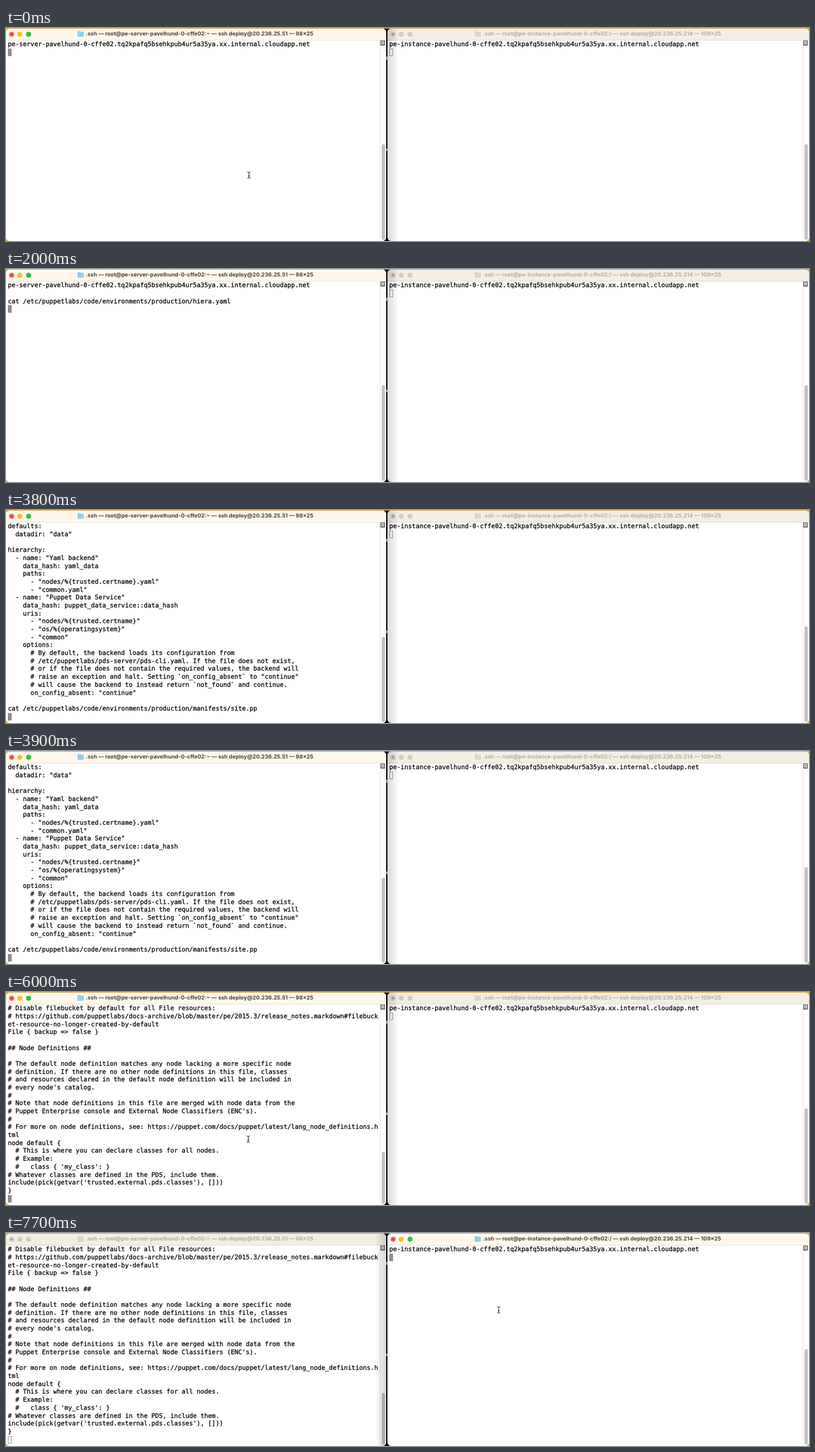
Animation, 1280 px wide and 341 px high, one loop 8 s. Source, as an HTML page:

```html
<!DOCTYPE html>
<html lang="en">
<head>
<meta charset="utf-8">
<title>Two terminals</title>
<style>
html, body { margin: 0; width: 100%; height: 100%; overflow: hidden; }
body { position: relative; background:
  linear-gradient(#888 0 0) 606px 46px / 2px 5px no-repeat,
  linear-gradient(#888 0 0) 606px 193px / 2px 4px no-repeat,
  linear-gradient(#000 0 0) 600px 1px / 14px 340px no-repeat, #d3a54e; }
div, pre, i, svg { position: absolute; box-sizing: border-box; margin: 0; }
.win { top: 1px; height: 340px; border-radius: 6px; overflow: hidden; background: #fff; text-rendering: geometricPrecision; }
.bar { left: 0; right: 0; top: 0; height: 19px; background: #f3ede4; border-bottom: 1px solid #e3ddd5; }
.title { top: 0; width: 500px; margin-left: -250px; text-align: center; white-space: pre;
  font: 700 8.7px/18px Inter, "Liberation Sans", sans-serif; color: #b3ada5; }
.light { top: 5px; width: 8px; height: 8px; border-radius: 50%; background: #d2ccc4; }
.dot { left: 2.7px; top: 2.7px; width: 2.6px; height: 2.6px; border-radius: 50%; background: #5c5955; }
.folder { top: 5px; width: 10px; height: 8px; border-radius: 1px; background: #ddd6cc; }
.folder i { left: 0; top: -1px; width: 4.5px; height: 2px; border-radius: 1px; background: inherit; }
.text { left: 3px; top: 20.4px; font: 10px/12.67px "DejaVu Sans Mono", monospace; color: #000; -webkit-text-stroke: .25px #000; }
.caret { left: 3px; width: 6px; height: 12.4px; border: 1px solid #a2a2a2; }
.track { right: 0; top: 19px; bottom: 0; width: 10px; background: #fcfcfc; border-left: 1px solid #e8e8e8; }
.thumb { right: 2px; bottom: 2px; width: 5.4px; border-radius: 3px; background: #c1c1c1; }
.split { right: 2px; top: 19px; width: 7px; height: 8px; border: 1px solid #555;
  background: repeating-linear-gradient(#fff 0 1px, #777 1px 2px); }
.shade { top: 0; bottom: 0; width: 16px; }
.active .bar { background: #fff7eb; border-color: #ece4d8; }
.active .title { color: #47433e; }
.active .red { background: #fe5f57; }
.active .amber { background: #febc2e; }
.active .green { background: #28c840; }
.active .dot { background: #7e150f; }
.active .folder { background: #93d0ee; }
.active .caret { background: #8f8f8f; border-color: #8f8f8f; }
.active .shade { display: none; }
#pointer { left: -4px; top: -7px; width: 8px; height: 14px; fill: none; stroke: #222; }
</style>
</head>
<body>
<svg id="pointer" viewBox="-4 -7 8 14"><path d="M-2.5-5Q0-5 0-3.5V3.5Q0 5-2.5 5M2.5-5Q0-5 0-3.5M0 3.5Q0 5 2.5 5M-1.3 1.5H1.3"/></svg>
<script>
const LINE = 12.7, ROWS = 24, LOOP = 8000;
const domain = ".tq2kpafq5bsehkpub4ur5a35ya.xx.internal.cloudapp.net";
const server = "pe-server-pavelhund-0-cffe02";
const agent = "pe-instance-pavelhund-0-cffe02";

const hiera = `version: 5

defaults:
  datadir: "data"

hierarchy:
  - name: "Yaml backend"
    data_hash: yaml_data
    paths:
      - "nodes/%{trusted.certname}.yaml"
      - "common.yaml"
  - name: "Puppet Data Service"
    data_hash: puppet_data_service::data_hash
    uris:
      - "nodes/%{trusted.certname}"
      - "os/%{operatingsystem}"
      - "common"
    options:
      # By default, the backend loads its configuration from
      # /etc/puppetlabs/pds-server/pds-cli.yaml. If the file does not exist,
      # or if the file does not contain the required values, the backend will
      # raise an exception and halt. Setting \`on_config_absent\` to "continue"
      # will cause the backend to instead return \`not_found\` and continue.
      on_config_absent: "continue"`;

const manifest = `# Disable filebucket by default for all File resources:
# https://github.com/puppetlabs/docs-archive/blob/master/pe/2015.3/release_notes.markdown#filebuck
et-resource-no-longer-created-by-default
File { backup => false }

## Node Definitions ##

# The default node definition matches any node lacking a more specific node
# definition. If there are no other node definitions in this file, classes
# and resources declared in the default node definition will be included in
# every node's catalog.
#
# Note that node definitions in this file are merged with node data from the
# Puppet Enterprise console and External Node Classifiers (ENC's).
#
# For more on node definitions, see: https://puppet.com/docs/puppet/latest/lang_node_definitions.h
tml
node default {
  # This is where you can declare classes for all nodes.
  # Example:
  #   class { 'my_class': }
# Whatever classes are defined in the PDS, include them.
include(pick(getvar('trusted.external.pds.classes'), []))
}`;

const envDir = "/etc/puppetlabs/code/environments/production/";
// time, text added to the log, top of the scroll thumb
const events = [
  [0, server + domain, 186],
  [1500, `\ncat ${envDir}hiera.yaml`, 186],
  [2500, hiera, 198],
  [3800, `\ncat ${envDir}manifests/site.pp`, 203],
  [4900, manifest, 256],
];

const pointer = document.getElementById("pointer");

function makeWindow(left, width, title, titleX, folderX, shade) {
  const win = document.createElement("div");
  win.className = "win";
  win.style.cssText = `left:${left}px;width:${width}px`;
  const lights = ["red", "amber", "green"].map((name, i) =>
    `<div class="light ${name}" style="left:${5 + i * 13.4}px">${i ? "" : '<i class="dot"></i>'}</div>`);
  win.innerHTML = `<div class="bar">${lights.join("")}
    <div class="folder" style="left:${folderX}px"><i></i></div>
    <div class="title" style="left:${titleX}px">${title}</div></div>
    <div class="track"></div><div class="split"></div><div class="thumb"></div>
    <div class="caret"></div><pre class="text"></pre>
    <div class="shade" style="${shade}"></div>`;
  document.body.insertBefore(win, pointer);
  const part = name => win.querySelector("." + name);
  return {
    show(lines, thumbTop, active) {
      const text = lines.join("\n");
      if (part("text").textContent !== text) part("text").textContent = text;
      part("caret").style.top = 19 + lines.length * LINE + "px";
      part("thumb").style.top = thumbTop - 1 + "px";
      win.classList.toggle("active", active);
    }
  };
}

const shadeFrom = (side, end) =>
  `${side}:0;background:linear-gradient(to ${end},rgba(0,0,0,.15),rgba(0,0,0,.02))`;
const leftWin = makeWindow(0, 606,
  `.ssh — root@${server}:~ — ssh deploy@20.236.25.51 — 98×25`, 308.5, 114, shadeFrom("right", "left"));
const rightWin = makeWindow(608, 672,
  `.ssh — root@${agent}:/ — ssh deploy@20.236.25.214 — 109×25`, 342, 139, shadeFrom("left", "right"));

function movePointer(t) {
  const p = Math.min(1, Math.max(0, (t - 7100) / 500));
  const ease = p * p * (3 - 2 * p);
  const mix = (a, b) => a + (b - a) * ease;
  const startX = t < 1200 ? 387.3 : t < 5500 ? 386.6 : 386.2;
  pointer.style.visibility = t >= 1200 && t < 5300 ? "hidden" : "visible";
  pointer.style.transform = `translate(${mix(startX, 785.3)}px,${mix(235.5, 123.2)}px)`;
}

function draw(t) {
  const past = events.filter(e => e[0] <= t);
  const log = past.flatMap(e => e[1].split("\n"));
  const focusRight = t >= 7700;
  leftWin.show(log.slice(-ROWS), past[past.length - 1][2], !focusRight);
  rightWin.show([agent + domain], 186, focusRight);
  movePointer(t);
}

const start = performance.now();
function tick() {
  // the picture changes ten times a second
  draw(Math.floor((performance.now() - start) % LOOP / 100) * 100);
  requestAnimationFrame(tick);
}
tick();
</script>
</body>
</html>
```
